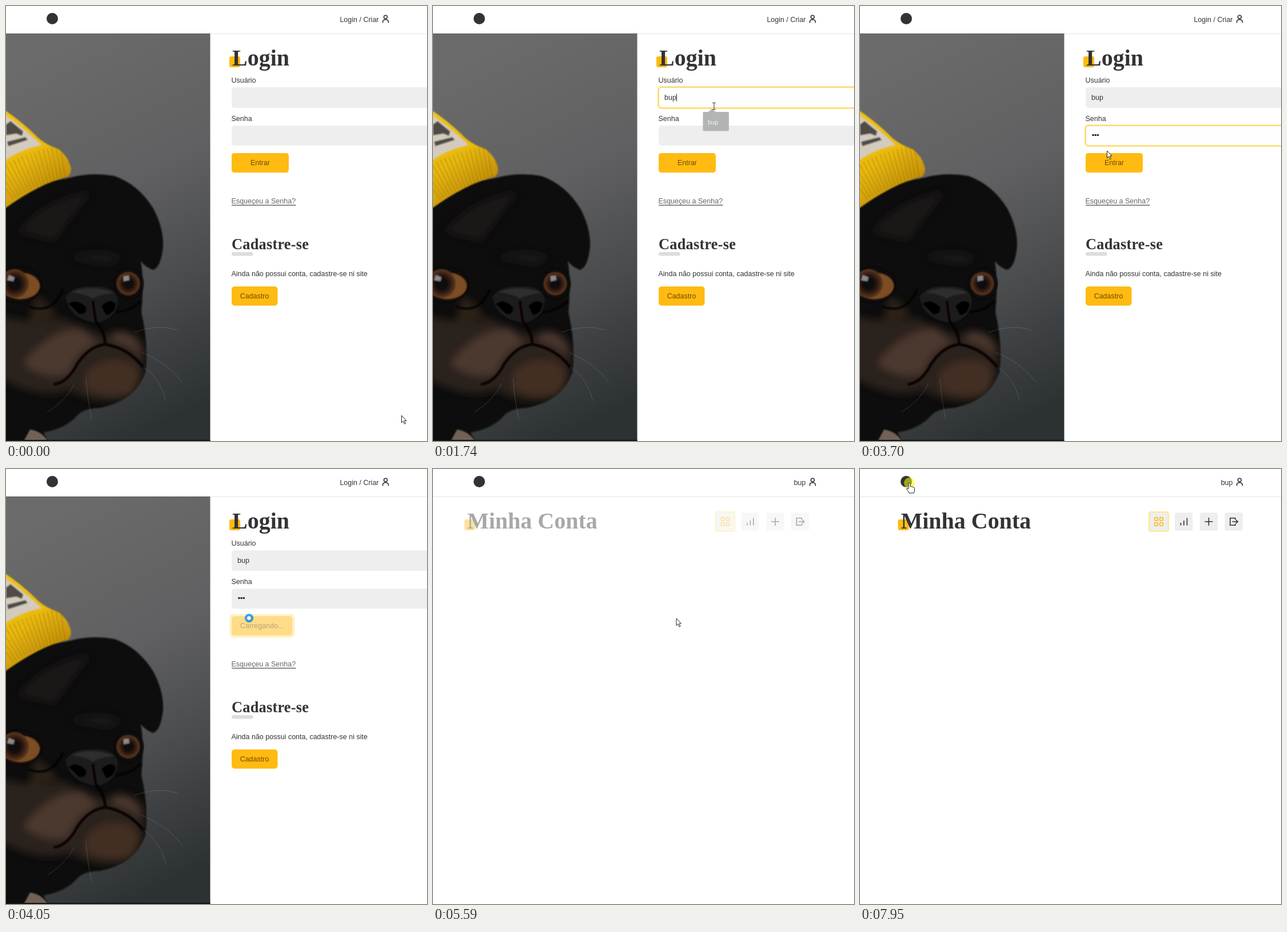
An HTML page that plays this animation: 737 by 760 pixels, repeating every 8000 ms.

```html
<!DOCTYPE html>
<html lang="pt-BR">
<head>
<meta charset="utf-8">
<title>Login</title>
<style>
html, body { margin: 0; width: 100%; height: 100%; overflow: hidden; background: #fff; }
svg { display: block; width: 737px; height: 760px; }
text { font: 12.5px "Liberation Sans", Arial, sans-serif; fill: #333; }
.title { font: bold 40px "Liberation Serif", "Noto Serif", serif; }
.sub { font: bold 26.4px "Liberation Serif", "Noto Serif", serif; letter-spacing: .2px; }
.btn { fill: #fb1; }
.btn + text, .label { fill: #764701; text-anchor: middle; }
.line { fill: none; stroke: #333; stroke-width: 1.6; }
.ring { fill: #fea; }
.field { fill: #eee; }
.on .field { fill: #fefefe; stroke: #fb1; stroke-width: 1; }
.ring, .halo { visibility: hidden; }
.on .ring, .on .halo { visibility: visible; }
.cursor { fill: #fff; stroke: #222; stroke-width: 1; stroke-linejoin: round; }
</style>
</head>
<body>
<svg viewBox="0 0 737 760">
  <defs>
    <linearGradient id="wall" x1=".35" y1="0" x2=".6" y2="1">
      <stop offset="0" stop-color="#6b6b6b"/><stop offset=".4" stop-color="#606062"/>
      <stop offset=".7" stop-color="#484a4c"/><stop offset="1" stop-color="#2c3132"/>
    </linearGradient>
    <linearGradient id="wool" x1="0" y1="0" x2=".5" y2="1">
      <stop offset="0" stop-color="#eec51c"/><stop offset=".55" stop-color="#e9ba0c"/><stop offset="1" stop-color="#b98605"/>
    </linearGradient>
    <radialGradient id="iris">
      <stop offset=".3" stop-color="#0c0807"/><stop offset=".6" stop-color="#2c1810"/><stop offset="1" stop-color="#5f3a20"/>
    </radialGradient>
    <filter id="soft"><feGaussianBlur stdDeviation="1.3"/></filter>
    <filter id="blur"><feGaussianBlur stdDeviation="7"/></filter>
    <clipPath id="frame"><path d="M0 48H357.5V760H0z"/></clipPath>
    <clipPath id="head"><path d="M-5 320L112 300Q150 290 190 297Q232 312 240 450Q242 480 237 535Q250 590 244 640Q225 690 165 702Q135 703 124 716Q105 738 66 745L75 765H-5z"/></clipPath>
  </defs>

  <g id="login">
    <g clip-path="url(#frame)">
      <path fill="url(#wall)" d="M0 48H358V760H0z"/>
      <g filter="url(#soft)">
        <path fill="#100f0f" d="M-5 320L112 300Q150 290 190 297Q232 312 258 354Q276 388 275 420Q271 458 257 461Q244 456 236 446Q242 480 237 535Q250 590 244 640Q225 690 165 702Q135 703 124 716Q105 738 66 745L75 765H-5z"/>
        <path fill="#09090a" d="M186 302Q228 316 256 360Q275 398 271 438Q264 464 248 453Q225 420 212 380Q205 330 186 302z"/>
      </g>
      <g clip-path="url(#head)">
        <g filter="url(#blur)">
          <path fill="#252120" d="M20 395Q70 335 150 325Q120 360 85 410zM110 440Q160 420 205 440L180 452z" opacity=".6"/>
          <path fill="#2b201b" d="M-10 540Q60 560 100 545Q140 570 175 575Q220 560 240 590Q250 650 215 685Q160 700 110 670Q60 690 -10 650z"/>
          <path fill="#4b382d" d="M30 625Q75 565 135 562L160 590Q125 600 110 642Q70 655 30 625zM187 570Q225 560 240 612Q210 588 187 586z"/>
          <path fill="#422e24" d="M140 640Q170 610 215 622Q245 640 225 675Q180 690 140 670z"/>
          <path fill="#37281f" d="M50 505Q75 515 90 545L40 555z" opacity=".7"/>
        </g>
        <path filter="url(#soft)" fill="#8c7867" d="M42 740Q62 742 75 762H30z" opacity=".8"/>
      </g>
      <g filter="url(#soft)">
        <ellipse cx="22" cy="487" rx="40" ry="31" fill="#090707"/>
        <ellipse cx="25" cy="489" rx="34" ry="23" fill="#7c4d20"/>
        <circle cx="15" cy="485" r="25" fill="url(#iris)"/>
        <ellipse cx="215" cy="485" rx="26" ry="27" fill="#090707"/>
        <circle cx="214" cy="485" r="20" fill="url(#iris)"/>
        <path fill="#b9bcc2" d="M5 470l10 4-2 7-11-2zM206 472l9-1 1 8-10 2z" opacity=".7"/>
        <path fill="#1c1b1c" d="M104 508Q118 487 153 490Q190 488 196 512Q196 545 160 554Q110 548 104 508z"/>
        <path fill="#343233" d="M114 500Q150 486 190 501Q155 506 152 512Q145 504 114 500z" opacity=".8"/>
        <path fill="#050505" d="M110 520Q124 510 140 526Q142 540 128 538zM167 524Q182 510 192 520Q190 538 175 540z"/>
        <path fill="none" stroke="#070606" stroke-width="4.500" d="M152 515L157 550Q173 570 174 590M84 661Q108 658 125 625Q146 594 174 591Q215 598 241 632"/>
        <path fill="none" stroke="#080707" stroke-width="4" d="M40 525Q80 540 100 495M192 535Q220 532 236 515" opacity=".8"/>
      </g>
      <g fill="none" stroke="#b5b5b5" stroke-width=".6" opacity=".4">
        <path d="M238 605Q285 625 308 657M240 630Q270 650 280 690M225 570Q265 555 300 566M140 650Q143 690 150 722M120 660Q105 690 72 710"/>
      </g>
      <g filter="url(#soft)">
        <path fill="url(#wool)" d="M-5 180Q25 200 50 224Q64 240 92 250Q108 262 113 280Q116 290 109 298Q58 310 -5 356z"/>
        <path fill="none" stroke="#8d6203" stroke-width="60" stroke-dasharray="2 5" opacity=".35" d="M-5 314Q40 282 104 273"/>
        <path fill="#d3cbbd" d="M-5 189Q30 212 62 243Q30 248-5 271z"/>
        <path fill="#393633" d="M0 207l8-6 22 18-2 8-10-4-18 3zM2 237l32-8 4 5-34 11z" opacity=".85"/>
      </g>
      <path fill="#171214" d="M0 758H358V760H0z"/>
    </g>

    <rect class="btn" x="391" y="88" width="19" height="19" rx="3"/>
    <g><text class="title" x="396" y="104">Login</text></g>
    <text x="394.5" y="133.5">Usuário</text>
    <g id="user">
      <rect class="ring" x="392.7" y="139.7" width="360" height="40.6" rx="7"/>
      <rect class="field" x="395" y="142" width="360" height="36" rx="5"/>
      <text id="name" x="405" y="164"></text>
    </g>
    <text x="394.5" y="200.5">Senha</text>
    <g id="pass">
      <rect class="ring" x="392.7" y="206.7" width="360" height="39.6" rx="7"/>
      <rect class="field" x="395" y="209" width="360" height="35" rx="5"/>
      <g id="dots" fill="#222"><circle cx="408" cy="225.5" r="1.8"/><circle cx="412.2" cy="225.5" r="1.8"/><circle cx="416.4" cy="225.5" r="1.8"/></g>
    </g>
    <path id="caret" stroke="#222" d="M426.5 153.5V166.5"/>
    <g id="hint">
      <path fill="#b3b4b4" d="M474 185H482L488.500 179.500L495 185H516Q518 185 518 187V216.500Q518 218.500 516 218.500H474.500Q472.500 218.500 472.500 216.500V187Q472.500 185 474 185z"/>
      <text x="481" y="206.500" style="font-size:11px;fill:#f4f4f4">bup</text>
    </g>
    <g id="enter">
      <rect class="halo btn" x="391.9" y="253.9" height="40.2" rx="6"/>
      <rect class="ring" x="392.7" y="254.7" height="38.6" rx="5.500"/>
      <rect class="btn" x="395" y="257" height="34" rx="4.500"/>
      <text id="caption" class="label" y="278"></text>
    </g>
    <text x="394.5" y="345" style="fill:#666">Esqueçeu a Senha?</text>
    <path stroke="#666" stroke-width="1.5" d="M395 348H507.5"/>
    <rect x="395" y="430" width="37.5" height="6.500" rx="3" fill="#ddd"/>
    <text class="sub" x="395" y="425">Cadastre-se</text>
    <text x="394.5" y="472">Ainda não possui conta, cadastre-se ni site</text>
    <rect class="btn" x="395" y="490" width="80.500" height="33.500" rx="5"/>
    <text x="435" y="511">Cadastro</text>
  </g>

  <g id="account">
    <rect class="btn" x="66.5" y="88" width="19" height="19" rx="3"/>
    <g><text class="title" x="71.5" y="104">Minha Conta</text></g>
    <rect x="505" y="74" width="36" height="36" rx="4" fill="#fde994"/>
    <g fill="#eee">
      <rect x="507.300" y="76.300" width="31.400" height="31.400" rx="3"/>
      <rect x="551" y="76.300" width="31.400" height="31.400" rx="3"/>
      <rect x="595" y="76.300" width="31.400" height="31.400" rx="3"/>
      <rect x="638.500" y="76.300" width="31.400" height="31.400" rx="3"/>
    </g>
    <g class="line" style="stroke:#fb1">
      <rect x="515.800" y="84.800" width="5.500" height="5.500" rx="1"/><rect x="524.800" y="84.800" width="5.500" height="5.500" rx="1"/>
      <rect x="515.800" y="93.800" width="5.500" height="5.500" rx="1"/><rect x="524.800" y="93.800" width="5.500" height="5.500" rx="1"/>
    </g>
    <path class="line" d="M561.500 94V98.500M567 90V98.500M572.500 85.500V98.500M603.500 92H617.500M610.500 85V99M657 88.500V85.800H648V98.200H657V95.500M651.500 92H661M658 88.800L661.300 92L658 95.200"/>
  </g>

  <path fill="#fff" d="M0 0H737V48H0z"/>
  <path stroke="#000" opacity=".1" d="M0 48.500H737"/>
  <circle cx="81" cy="22" r="10" fill="#333"/>
  <text id="who" x="652.500" y="27.500" text-anchor="end"></text>
  <g class="line" stroke-linecap="round"><circle cx="664.500" cy="19.300" r="3"/><path d="M659.600 29V27.500Q659.600 23.800 664.500 23.800T669.400 27.500V29"/></g>

  <circle id="click" cx="86.500" cy="24.500" r="9.500" fill="#ff0" opacity=".55"/>
  <g id="pointer">
    <path id="arrow" class="cursor" d="M.5 .5V13L3.300 10.300L5.600 15.300L7.600 14.400L5.300 9.500H9z"/>
    <path id="beam" fill="none" stroke="#333" d="M-3-6H-1L0-5L1-6H3M0-5V5M-3 6H-1L0 5L1 6H3"/>
    <path id="hand" class="cursor" d="M-1.500 1Q0-.8 1.500 1V7Q3 5.600 4.200 7.200Q5.800 6.200 6.800 8Q8.800 7.500 9 9.500V13Q9 15 7.500 18H-.5Q-1 15.500-4.500 12Q-5.500 9.500-3.500 9.500L-1.500 11z"/>
    <g id="wait" fill="none" stroke-width="4"><circle r="5.500" fill="#fff" fill-opacity=".6" stroke="#2ba5f0"/><path id="arc" stroke="#4193cf" d="M0-5.500A5.500 5.500 0 0 1 0 5.500"/></g>
  </g>
</svg>
<script>
const $ = id => document.getElementById(id);
const show = (id, on) => $(id).style.display = on ? "" : "none";
const clamp = v => Math.max(0, Math.min(1, v));
const ramp = (t, a, b) => clamp((t - a) / (b - a));
const LOADING = 3910, LOGGED = 5590;
// time, x, y of the pointer
const path = [[70, 692, 715], [770, 492, 175], [3210, 492, 175], [3280, 494, 176],
  [3800, 425.5, 260.5], [7220, 425.5, 260.5], [7900, 86.5, 24]];

function pointerAt(t) {
  let i = 0;
  while (i < path.length - 2 && t > path[i + 1][0]) i++;
  const [a, x, y] = path[i], [b, X, Y] = path[i + 1];
  let p = ramp(t, a, b);
  p = p * p * (3 - 2 * p);
  return [x + (X - x) * p, y + (Y - y) * p];
}

function draw(t) {
  const [x, y] = pointerAt(t);
  const logged = t >= LOGGED, loading = t >= LOADING && !logged;
  const over = (l, top, r, b) => x >= l && x <= r && y >= top && y <= b;
  const onUser = !logged && over(395, 142, 737, 178);
  const onPass = !logged && over(395, 209, 737, 244);
  const onEnter = !logged && over(395, 257, 495, 291);
  const kind = loading ? "wait" : onUser || onPass ? "beam"
    : onEnter || over(70, 12, 92, 34) ? "hand" : "arrow";

  show("login", !logged);
  show("account", logged);
  const enter = ramp(t, LOGGED - 50, LOGGED + 70);
  $("account").setAttribute("opacity", enter);
  $("account").setAttribute("transform", `translate(${-20 * (1 - enter)})`);
  $("who").textContent = logged ? "bup" : "Login / Criar";

  $("user").classList.toggle("on", onUser || t >= 770 && t < 2020);
  $("pass").classList.toggle("on", onPass || t >= 2020 && t < LOADING);
  const typed = [1210, 1420, 1630].filter(k => t >= k).length;
  $("name").textContent = "bup".slice(0, typed);
  show("caret", typed && t < 1950);
  $("caret").setAttribute("transform", `translate(${(typed - 3) * 6.95})`);
  $("hint").setAttribute("opacity", ramp(t, 1280, 1420) * (1 - ramp(t, 1750, 1930)));
  [...$("dots").children].forEach((d, i) => d.setAttribute("opacity", t >= 2420 + i * 110 ? 1 : 0));

  const width = loading ? 106.500 : 100;
  $("enter").classList.toggle("on", onEnter);
  $("enter").setAttribute("opacity", loading ? .5 : 1);
  [...$("enter").querySelectorAll("rect")].forEach((r, i) => r.setAttribute("width", width + [6.2, 4.6, 0][i]));
  $("caption").setAttribute("x", 395 + width / 2);
  $("caption").textContent = loading ? "Carregando..." : "Entrar";

  show("click", t >= 7880);
  for (const k of ["arrow", "beam", "hand", "wait"]) show(k, k === kind);
  $("pointer").setAttribute("transform", `translate(${x} ${y})`);
  $("arc").setAttribute("transform", `rotate(${(t - LOADING) * .36})`);
}

function tick() {
  draw(performance.now() % 8000);
  requestAnimationFrame(tick);
}
tick();
</script>
</body>
</html>
```
